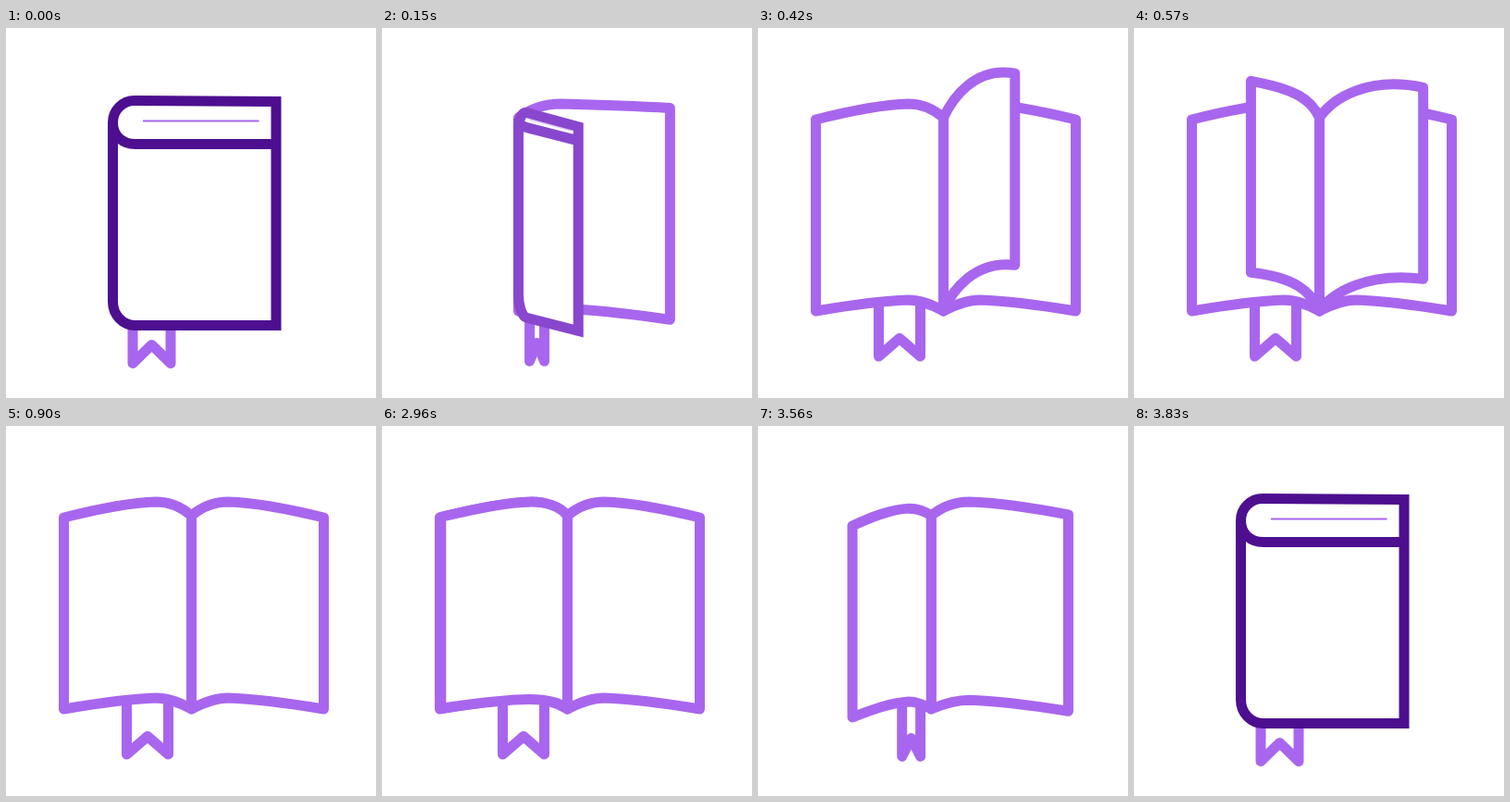
An HTML page with a canvas for the animation above (4.86 s loop, 400 by 400 pixels).

```html
<!DOCTYPE html>
<html lang="en">
<head>
<meta charset="utf-8">
<title>Opening book</title>
<style>
html, body { margin: 0; width: 100%; height: 100%; overflow: hidden; background: #fff; }
canvas { display: block; width: 400px; height: 400px; }
</style>
</head>
<body>
<canvas id="stage" width="400" height="400"></canvas>
<script>
const ctx = document.getElementById('stage').getContext('2d');
const LOOP = 4860, STEP = 30, OPENED = 900, CLOSED = 3830;
const LIGHT = [168, 102, 238], DARK = [77, 15, 143];
const TOP = 97, BOTTOM = 306;

const lerp = (a, b, k) => a + (b - a) * k;
const clamp = v => Math.min(1, Math.max(0, v));
const ease = v => { v = clamp(v); return v * v * (3 - 2 * v); };
const mix = (a, b, k) => `rgb(${a.map((v, i) => Math.round(lerp(v, b[i], k)))})`;
const PURPLE = mix(LIGHT, LIGHT, 0);

// Piecewise linear value through [position, value] pairs.
function along(points, v) {
  for (let i = 1; i < points.length; i++) {
    const [x0, y0] = points[i - 1], [x1, y1] = points[i];
    if (v <= x1) return lerp(y0, y1, (v - x0) / (x1 - x0));
  }
  return points[points.length - 1][1];
}

function paint(path, color = PURPLE, join = 'round') {
  ctx.fillStyle = '#fff';
  ctx.strokeStyle = color;
  ctx.lineWidth = 11;
  ctx.lineJoin = join;
  ctx.lineCap = 'round';
  ctx.fill(path);
  ctx.stroke(path);
}

function drawBookmark(q) {
  const mid = lerp(157.5, 153, q) + 55 * q * (1 - q);
  const half = lerp(-20.5, 22.5, q);
  const top = lerp(321, 297, q), foot = lerp(362.5, 355, q), notch = lerp(342.5, 335.5, q);
  const path = new Path2D();
  path.moveTo(mid - half, top);
  path.lineTo(mid - half, foot);
  path.lineTo(mid, notch);
  path.lineTo(mid + half, foot);
  path.lineTo(mid + half, top);
  paint(path);
}

// One resting page from the spine sx to the outer edge ex.
function drawPage(sx, ex, top, bottom, knotTop, knotBottom) {
  const at = f => lerp(sx, ex, f);
  const path = new Path2D();
  path.moveTo(sx, TOP);
  path.bezierCurveTo(at(.08), lerp(TOP, knotTop, .65), at(.17), knotTop, at(.28), knotTop);
  path.bezierCurveTo(at(.52), knotTop + 1, at(.77), lerp(knotTop, top, .53), ex, top);
  path.lineTo(ex, bottom);
  path.bezierCurveTo(at(.77), lerp(knotBottom, bottom, .55), at(.52), knotBottom + 1, at(.28), knotBottom);
  path.bezierCurveTo(at(.17), knotBottom, at(.08), lerp(BOTTOM, knotBottom, .5), sx, BOTTOM);
  path.closePath();
  paint(path);
}

function drawCover(sx, k, m, shift) {
  const left = 115.5, band = lerp(125.5, 80, m), mid = (79.5 + band) / 2;
  const body = new Path2D(), fold = new Path2D(), line = new Path2D();
  body.moveTo(292, 79.5);
  body.lineTo(139, 78.5);
  body.bezierCurveTo(126, 78.5, left, 89, left, 102);
  body.lineTo(left, 296);
  body.bezierCurveTo(left, 310, 126, 321.5, 140, 321.5);
  body.lineTo(292, 321.5);
  body.closePath();
  fold.moveTo(left, mid);
  fold.bezierCurveTo(left, lerp(mid, band, .6), 126, band, 140, band);
  fold.lineTo(292, band);
  line.moveTo(148, mid - 2);
  line.lineTo(273.5, mid - 2);

  const squash = lerp(1, .864, m), skew = shift / 176.5;
  const place = new DOMMatrix([k, skew, 0, squash, sx - left * k, 201.5 * (1 - squash) - left * skew]);
  const put = path => { const p = new Path2D(); p.addPath(path, place); return p; };
  paint(put(body), mix(DARK, LIGHT, m), 'miter');
  ctx.lineCap = 'butt';
  ctx.stroke(put(fold));
  ctx.globalAlpha = 1 - m;
  ctx.lineWidth = 1.8;
  ctx.strokeStyle = PURPLE;
  ctx.stroke(put(line));
  ctx.globalAlpha = 1;
}

// A leaf in the air; v runs from 0 (right) to 1 (left).
function drawLeaf(sx, ex, v) {
  const dx = ex - sx, c = Math.min(1, Math.abs(dx) / (dx > 0 ? 143 : 138));
  const rise = 61 * Math.pow(1 - c * c, dx > 0 ? .59 : 1.12);
  const bow = along([[0, -22], [.1, -13], [.5, 0], [.77, 9], [1, -22]], v);
  const top = 99 - rise, bottom = BOTTOM - rise;
  const near = sx + dx * .12, far = sx + dx * along([[0, .35], [.1, .46], [.77, .36], [1, .35]], v);
  const path = new Path2D();
  path.moveTo(sx, TOP);
  path.bezierCurveTo(near, TOP - 20, far, top + bow, ex, top);
  path.lineTo(ex, bottom);
  path.bezierCurveTo(far, bottom + bow * .6, near, BOTTOM - 14 - rise * .17, sx, BOTTOM);
  path.closePath();
  paint(path);
}

function draw(s) {
  ctx.fillStyle = '#fff';
  ctx.fillRect(0, 0, 400, 400);
  const p = ease(s / 360);
  const sx = lerp(115.5, 200.5, p), right = lerp(292, 343.5, p);
  const left = lerp(292, 62.5, p) + 28 * p * (1 - p);
  const shift = Math.min(57 * (1 - p), 44 * p);

  drawBookmark(ease(s / 420));
  if (p > 0) drawPage(sx, right, lerp(79, 99, p), lerp(321, 306, p), 82, lerp(309, 294, p));
  if (left > sx) {
    drawCover(sx, (left - sx) / 176.5, clamp(p / .58), shift);
  } else {
    drawPage(sx, left, 99 + shift, 306 + shift, 82 + shift * .8, 294 + shift * .45);
  }

  const leaves = [295, 488]
    .map(start => ease((s - start) / 398))
    .filter(v => v > 0 && v < 1)
    .map(v => ({ v, x: lerp(right, 62.5, v) }));
  // The leaf nearest to upright lies in front.
  leaves.sort((a, b) => Math.abs(b.x - sx) - Math.abs(a.x - sx));
  leaves.forEach(({ v, x }) => drawLeaf(sx, x, v));
}

// Opening pose time for a moment in the loop; closing retraces it.
function poseAt(t) {
  if (t < CLOSED / 2) return Math.min(OPENED, Math.floor(t / STEP) * STEP);
  return Math.max(0, Math.min(OPENED, Math.ceil((CLOSED - t) / STEP) * STEP));
}

const begin = performance.now();
function tick() {
  // A small lead absorbs display timing jitter.
  draw(poseAt((performance.now() - begin + 4) % LOOP));
  requestAnimationFrame(tick);
}
tick();
</script>
</body>
</html>
```
